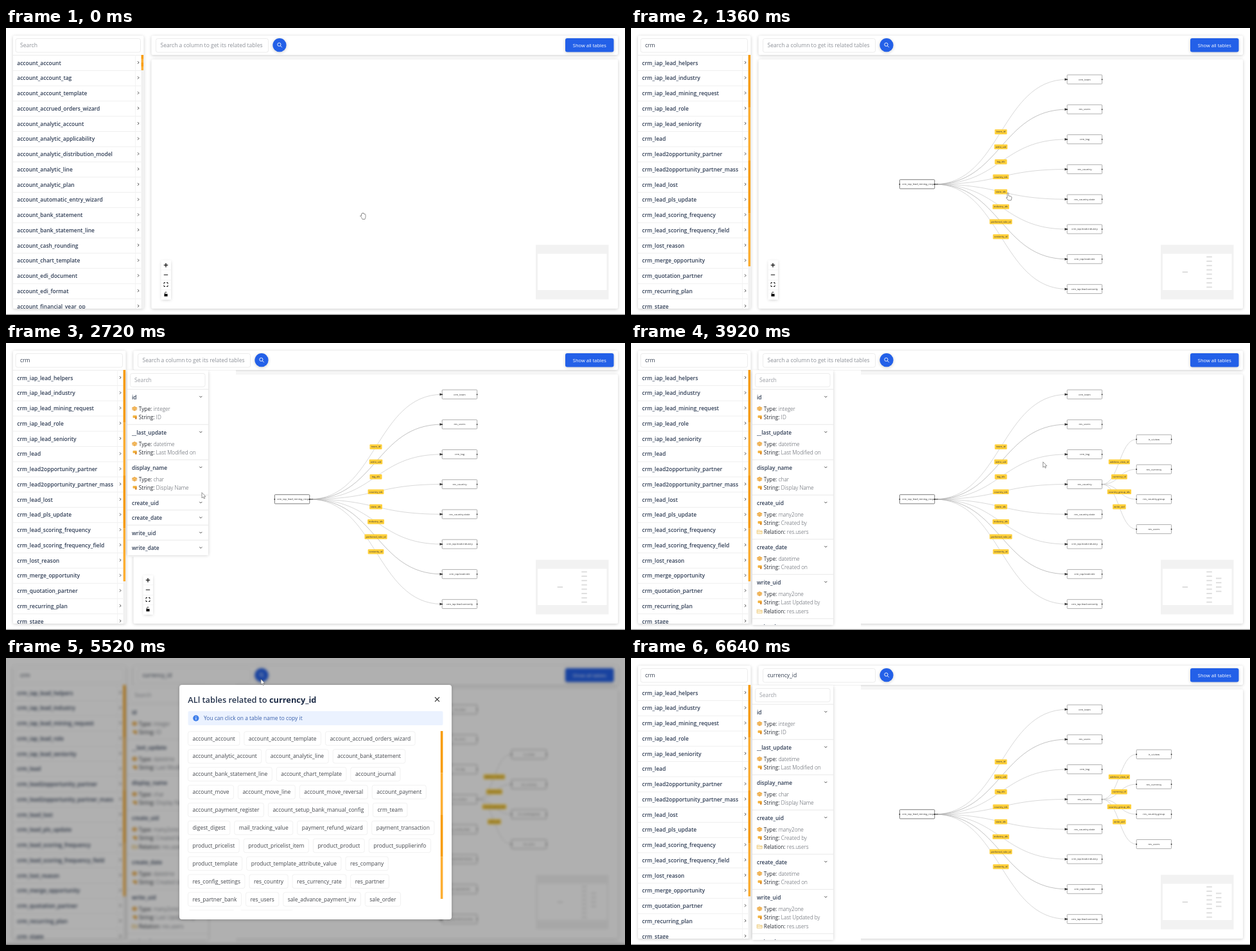
Write an HTML page with a canvas that moves like this. It is 964 px wide and 448 px high and loops after 6.72 s.

```html
<!DOCTYPE html>
<html lang="en">
<head>
<meta charset="utf-8">
<title>Table explorer</title>
<style>
html, body { margin: 0; overflow: hidden; background: #fff; }
canvas { display: block; width: 964px; height: 448px; }
</style>
</head>
<body>
<canvas id="stage" width="964" height="448"></canvas>
<script>
const LOOP = 6720, STEP = 80;
const canvas = document.getElementById('stage');
const c = canvas.getContext('2d');
const INK = '#2f3d55', PALE = '#ececec', BLUE = '#2360e8';

const accountTables = ('account account_tag account_template accrued_orders_wizard analytic_account ' +
  'analytic_applicability analytic_distribution_model analytic_line analytic_plan automatic_entry_wizard ' +
  'bank_statement bank_statement_line cash_rounding chart_template edi_document edi_format financial_year_op')
  .split(' ').map(s => 'account_' + s);
const crmTables = ('iap_lead_helpers iap_lead_industry iap_lead_mining_request iap_lead_role iap_lead_seniority ' +
  'lead lead2opportunity_partner lead2opportunity_partner_mass lead_lost lead_pls_update ' +
  'lead_scoring_frequency lead_scoring_frequency_field lost_reason merge_opportunity ' +
  'quotation_partner recurring_plan stage').split(' ').map(s => 'crm_' + s);
const partialTables = ['account_accrued_orders_wizard', ...crmTables.slice(0, -1)];

const leadLinks = [
  ['crm_team', 'team_id'], ['res_users', 'write_uid'], ['crm_tag', 'tag_ids'], ['res_country', 'country_ids'],
  ['res_country.state', 'state_ids'], ['crm_iap.lead.industry', 'industry_ids'],
  ['crm_iap.lead.role', 'preferred_role_id'], ['crm_iap.lead.seniority', 'seniority_id']];
const countryLinks = [
  ['ir_ui.view', 'address_view_id'], ['res_currency', 'currency_id'],
  ['res_country.group', 'country_group_ids'], ['res_users', 'write_uid']];

const fields = [
  ['id', 'integer', 'ID'], ['__last_update', 'datetime', 'Last Modified on'],
  ['display_name', 'char', 'Display Name'], ['create_uid', 'many2one', 'Created by', 'res.users'],
  ['create_date', 'datetime', 'Created on'], ['write_uid', 'many2one', 'Last Updated by', 'res.users'],
  ['write_date', 'datetime', 'Last Updated on']];

const relatedTables = [
  'account_account account_account_template account_accrued_orders_wizard',
  'account_analytic_account account_analytic_line account_bank_statement',
  'account_bank_statement_line account_chart_template account_journal',
  'account_move account_move_line account_move_reversal account_payment',
  'account_payment_register account_setup_bank_manual_config crm_team',
  'digest_digest mail_tracking_value payment_refund_wizard payment_transaction',
  'product_pricelist product_pricelist_item product_product product_supplierinfo',
  'product_template product_template_attribute_value res_company',
  'res_config_settings res_country res_currency_rate res_partner',
  'res_partner_bank res_users sale_advance_payment_inv sale_order',
  'sale_order_line sale_order_option'].map(row => row.split(' '));

const cursorShapes = {
  arrow: 'M0 0V8.5L2 6.8 3.4 9.6 4.7 9 3.4 6.3H6z',
  hand: 'M2 8V1.2a1 1 0 0 1 2 0V5l4 1q1 .5 1 2l-1 4H3.5L.3 8q.2-1.2 1.7 0z',
  grab: 'M2.5 7.5L.5 5.2q.5-1.2 2 .2V2q.8-1 1.6 0V1q.9-1 1.7 0V2q.9-1 1.6 0V3q1-.8 1.6.3V7L8 10.5H4z',
  beam: 'M0 0H3M1.5 0V9M0 9H3'
};
const cursorPath = [
  [0, 551, 288, 'grab'], [160, 90, 26, 'beam'], [480, 60, 24, 'arrow'], [800, 80, 98, 'hand'],
  [960, 80, 98, 'hand'], [1360, 584, 257, 'hand'], [1760, 584, 257, 'arrow'], [2000, 176, 98, 'hand'],
  [2080, 176, 98, 'arrow'], [2240, 303, 82, 'arrow'], [2416, 303, 137, 'arrow'], [2592, 305, 192, 'arrow'],
  [2768, 305, 249, 'arrow'], [2944, 303, 315, 'arrow'], [3120, 303, 370, 'arrow'], [3280, 584, 250, 'arrow'],
  [3440, 704, 218, 'hand'], [3840, 704, 218, 'arrow'], [4320, 330, 24, 'beam'], [5200, 330, 24, 'arrow'],
  [5360, 402, 34, 'hand'], [5520, 397, 33, 'arrow'], [5760, 325, 122, 'hand'], [5920, 325, 122, 'arrow'],
  [6160, 680.5, 65.5, 'arrow'], [6560, 680.5, 65.5, 'arrow']];

// Writes text centred vertically on y and returns its width.
function text(s, x, y, color = INK, size = 8.5, weight = 400, align = 'left') {
  c.font = `${weight} ${size}px "Open Sans", "Noto Sans", sans-serif`;
  c.textAlign = align;
  c.fillStyle = color;
  c.fillText(s, x, y + size * .35);
  return c.measureText(s).width;
}

function rect(x, y, w, h, fill, radius = 0, stroke, lineWidth = 1) {
  c.beginPath();
  c.roundRect(x, y, w, h, radius);
  if (fill) { c.fillStyle = fill; c.fill(); }
  if (stroke) { c.strokeStyle = stroke; c.lineWidth = lineWidth; c.stroke(); }
}

function shadowed(draw) {
  c.save();
  c.shadowColor = 'rgba(0,0,0,.2)';
  c.shadowBlur = 5;
  c.shadowOffsetY = 1;
  draw();
  c.restore();
}
const panel = (x, y, w, h, radius = 2) => shadowed(() => rect(x, y, w, h, '#fff', radius));

function disc(x, y, r, fill) {
  c.beginPath();
  c.arc(x, y, r, 0, 7);
  c.fillStyle = fill;
  c.fill();
}

function stroke(d, x, y, color, lineWidth = 1, fill) {
  const path = new Path2D(d);
  c.save();
  c.translate(x, y);
  if (fill) { c.fillStyle = fill; c.fill(path); }
  c.strokeStyle = color;
  c.lineWidth = lineWidth;
  c.stroke(path);
  c.restore();
}

function clipped(x, y, w, h, draw) {
  c.save();
  c.beginPath();
  c.rect(x, y, w, h);
  c.clip();
  draw();
  c.restore();
}

function scrollThumb(x, y, h) {
  for (let i = 0; i < 4; i++) rect(x, y + i * h / 4, 3.6, h / 4, i % 2 ? '#fdae32' : '#f89c06');
}

function input(x, w, value, hint, focused) {
  rect(x + .5, 16.5, w, 21.5, '#fff', 3, focused ? '#15181f' : PALE, focused ? 1.6 : 1);
  const width = text(value || hint, x + 7.5, 27.3, value ? '#303b4d' : '#8d9198', 8.55);
  if (focused) rect(x + 8.3 + (value ? width : 0), 22, .8, 10, '#222');
}

function sidebar(t, right) {
  panel(11, 12, right - 11, 426);
  const query = 'crm'.slice(0, t < 240 ? 0 : t < 320 ? 1 : t < 480 ? 2 : 3);
  input(14.5, right - 20, query, 'Search', t >= 160 && t < 1200);
  const tables = t < 320 ? accountTables : t < 480 ? partialTables : crmTables;
  clipped(11, 42, right - 11, 396, () => {
    rect(11, 42, right - 11, 1, PALE);
    tables.forEach((name, i) => {
      const y = 54.7 + 23.75 * i;
      text(name, 17.3, y, INK, 8.45, 600);
      stroke('M-1-2L1 0L-1 2', right - 8.5, y - .8, '#333', .9);
      rect(11, y + 11.4, right - 15, 1, '#efefef');
    });
    rect(right - 13.5, 42, .8, 396, '#f1f1f1');
    rect(right - 4, 42, 4, 396, '#f1f1f1');
    scrollThumb(right - 3.9, 42, t < 320 ? 24 : t < 480 ? 150 : 330);
  });
}

function toolbar(t, left) {
  panel(left, 12, 953 - left, 30);
  const typed = Math.max(0, (t - 4480) / STEP + 1);
  input(left + 6.5, 175, 'currency_id'.slice(0, typed), 'Search a column to get its related tables',
    t >= 4400 && t < 5440);
  shadowed(() => disc(left + 199.5, 26.7, 10.6, BLUE));
  stroke('M2.2 0A2.6 2.6 0 1 1-3 0A2.6 2.6 0 1 1 2.2 0M1.5 2L4 4.5', left + 199.3, 25.8, '#fff', .9);
  shadowed(() => rect(871, 16, 75.5, 21.5, BLUE, 3));
  text('Show all tables', 908.8, 27, '#fff', 7.5, 400, 'center');
}

function node(x, y, label, isRoot) {
  rect(x, y - 7.2, 54.4, 14.2, '#fff', 1, isRoot ? '#444' : '#777', isRoot ? .7 : .6);
  text(label, x + (isRoot ? 31.5 : 27.2), y, '#333', 4.05, 400, 'center');
  disc(x, y, .9, '#222');
  disc(x + 54.4, y, .9, '#222');
}

function fan(x1, y1, x2, top, links, arrows) {
  const mid = (x1 + x2) / 2, rowY = i => top + 46.75 * i;
  links.forEach(([name], i) => {
    const y = rowY(i);
    stroke(`M${x1} ${y1}C${mid} ${y1} ${mid} ${y} ${x2} ${y}`, 0, 0,
      arrows && (i === 1 || i === 6) ? '#8f8f8f' : '#b8b8b8', .55);
    node(x2, y, name);
    if (arrows) stroke('M-3.5-1.7L0 0L-3.5 1.7z', x2, y, '#222', .3, '#222');
  });
  links.forEach(([, label], i) => {
    const y = (y1 + rowY(i)) / 2;
    c.font = '400 3.9px "Open Sans", "Noto Sans", sans-serif';
    const w = Math.max(19, c.measureText(label).width + 4);
    rect(mid - w / 2, y - 3.8, w, 7.6, '#ffd03c', 1);
    text(label, mid, y, '#333', 3.9, 400, 'center');
  });
}

function minimap(hasLeads, hasCountry) {
  rect(825, 338.5, 113.5, 85, '#f2f2f2');
  rect(828, 352.5, 107.5, 56.5, '#fff');
  const mark = (x, y) => rect(x, y - 1, 8.5, 2, '#dedede');
  if (hasLeads) {
    mark(858.7, 381);
    leadLinks.forEach((_, i) => mark(896.3, 357.3 + 6.75 * i));
  }
  if (hasCountry) countryLinks.forEach((_, i) => mark(911, 367.4 + 6.75 * i));
}

function flow(t, left) {
  panel(left, 49, 953 - left, 389);
  if (t >= 1280) {
    fan(472.8, 243.9, 679.2, 80.3, leadLinks, true);
    node(418.4, 243.9, 'crm_iap_lead_mining_request', true);
  }
  if (t >= 3520) fan(733.6, 220.6, 787.2, 150.4, countryLinks, false);
  minimap(t >= 1280, t >= 3520);

  const x = left + 22.5;
  panel(x - 7.5, 362.5, 15.5, 61.5, 0);
  [377.5, 393, 408.5].forEach(y => rect(x - 7.5, y, 15.5, .6, '#eee'));
  stroke('M-3.2 0H3.2M0-3.2V3.2', x, 370.2, '#111', 1.3);
  stroke('M-3.2 0H3.2', x, 385.3, '#111', 1);
  stroke('M-3-1V-3H-1M1-3H3V-1M3 1V3H1M-1 3H-3V1', x, 400.5, '#111', 1);
  rect(x - 2.6, 415, 5.2, 4, '#111', .6);
  stroke('M-1.5 0V-1.5A1.5 1.5 0 0 1 1.4-1.8', x, 415, '#111', .9);
}

function fieldRow(icon, label, value, y) {
  if (icon === 0) {
    stroke('M-4-1L0-3.2L4-1L0 1.2zM-4 1L0 3.2L4 1', 200.2, y, '#e9a13b', 1, '#f5bd62');
  } else if (icon === 1) {
    rect(197.5, y - 3, 6.3, 4, '#f3b544', 1);
    rect(201, y - 1, 2.6, 4, '#d98c32', 1);
  } else {
    stroke('M-4-2.5H0L1-1.5H4V3H-4zM-4 0H4', 200.2, y, '#e8c473', .8, '#fff6dd');
  }
  const w = text(label, 206.8, y + .4, '#272b33', 8.25);
  text(value, 206.8 + w + 2.4, y + .4, '#4a4f58', 8.25, 300);
}

function drawer(t) {
  const isOpen = i => i < 6 && t >= 2240 + 176 * i;
  const heightOf = (f, i) => !isOpen(i) ? 23.5 : f[3] ? 69 : 55;
  const bottom = Math.min(440, fields.reduce((y, f, i) => y + heightOf(f, i), 72.3));
  rect(189, 42.5, 169, bottom === 440 ? 403 : bottom - 40, '#fff');
  panel(189, 42.5, 126, bottom - 42.5, 0);
  rect(193.5, 47.5, 116.5, 21, '#fff', 3, PALE);
  text('Search', 200, 57.7, '#9a9da3');
  clipped(189, 42, 127, bottom - 42, () => {
    let y = 72.3;
    fields.forEach((f, i) => {
      rect(189, y - .5, 126, 1, '#e8e8e8');
      text(f[0], 196, y + 12.4, INK, 8.4, 600);
      stroke('M-2-1L0 1L2-1', 303.3, y + 11.6, '#333', .9);
      if (isOpen(i)) {
        fieldRow(0, 'Type:', f[1], y + 30.2);
        fieldRow(1, 'String:', f[2], y + 43.8);
        if (f[3]) fieldRow(2, 'Relation:', f[3], y + 57.4);
      }
      y += heightOf(f, i);
    });
  });
}

function modal(t) {
  shadowed(() => rect(270, 42, 424, 366, '#fff', 4));
  const w = text('ALl tables related to ', 283.3, 65.6, '#26344d', 12.8, 600);
  text('currency_id', 283.3 + w, 65.6, '#1b2a45', 12.8, 700);
  stroke('M-3.5-3.5L3.5 3.5M3.5-3.5L-3.5 3.5', 671.5, 64.7, '#222', 1.1);
  rect(283.5, 83, 397, 22, '#ebf2ff', 2);
  disc(295.8, 94, 4.7, '#3f7fea');
  rect(295.3, 93.3, 1.1, 3.3, '#fff');
  rect(295.3, 91.2, 1.1, 1.1, '#fff');
  text('You can click on a table name to copy it', 308, 94.4, '#3c62ad', 8.45);
  clipped(280, 110, 403, 284, () => {
    relatedTables.forEach((row, r) => {
      let x = 283.5;
      const y = 125.6 + 27.9 * r;
      row.forEach(name => {
        const copied = name === 'account_account' && t >= 5760;
        const width = text(name, x + 7, y, copied ? '#34486b' : '#43464c', 8.48) + 14;
        rect(x, y - 10.8, width, 21.5, null, 3, '#f1f1f1');
        x += width + 7;
      });
    });
  });
  scrollThumb(676.8, 114, 262);
}

function toast() {
  shadowed(() => rect(10.5, 414, 141.5, 25, '#e6eeee', 2));
  disc(23, 426.5, 5, '#3c5f8c');
  stroke('M-2 0L-.5 1.5L2-1.5', 23, 426.5, '#b9cad8', .8);
  text('Copied!', 35, 426.7, '#26364a', 8.5, 600);
  stroke('M-2.7-2.7L2.7 2.7M2.7-2.7L-2.7 2.7', 137.2, 426.5, '#5f7f88', .9);
}

function cursor(t) {
  const i = cursorPath.findIndex(k => k[0] > t);
  if (i < 1) return;
  const [t0, x0, y0, kind] = cursorPath[i - 1], [t1, x1, y1] = cursorPath[i];
  const u = (t - t0) / (t1 - t0);
  stroke(cursorShapes[kind], x0 + (x1 - x0) * u, y0 + (y1 - y0) * u, '#666', .7, '#fff');
}

function draw(t) {
  rect(0, 0, 964, 448, '#fff');
  const wide = t < 480;
  flow(t, wide ? 226.5 : 198.5);
  toolbar(t, wide ? 226.5 : 198.5);
  sidebar(t, wide ? 214.5 : 186.5);
  if (t >= 2080) drawer(t);
  rect(0, 446.7, 964, 1.3, '#8c8c8c');

  if (t >= 5440 && t < 6640) {
    c.globalAlpha = t < 5520 || t >= 6560 ? .5 : 1;
    c.filter = 'blur(2px)';
    c.drawImage(canvas, 0, 0);
    c.filter = 'none';
    rect(0, 0, 964, 448, 'rgba(0,0,0,.31)');
    modal(t);
    if (t >= 5840) toast();
    c.globalAlpha = 1;
  }
  cursor(t);
}

let shown = -1;
function tick(now) {
  const t = Math.floor(now % LOOP / STEP) * STEP;
  if (t !== shown) draw(shown = t);
  requestAnimationFrame(tick);
}
requestAnimationFrame(tick);
</script>
</body>
</html>
```
